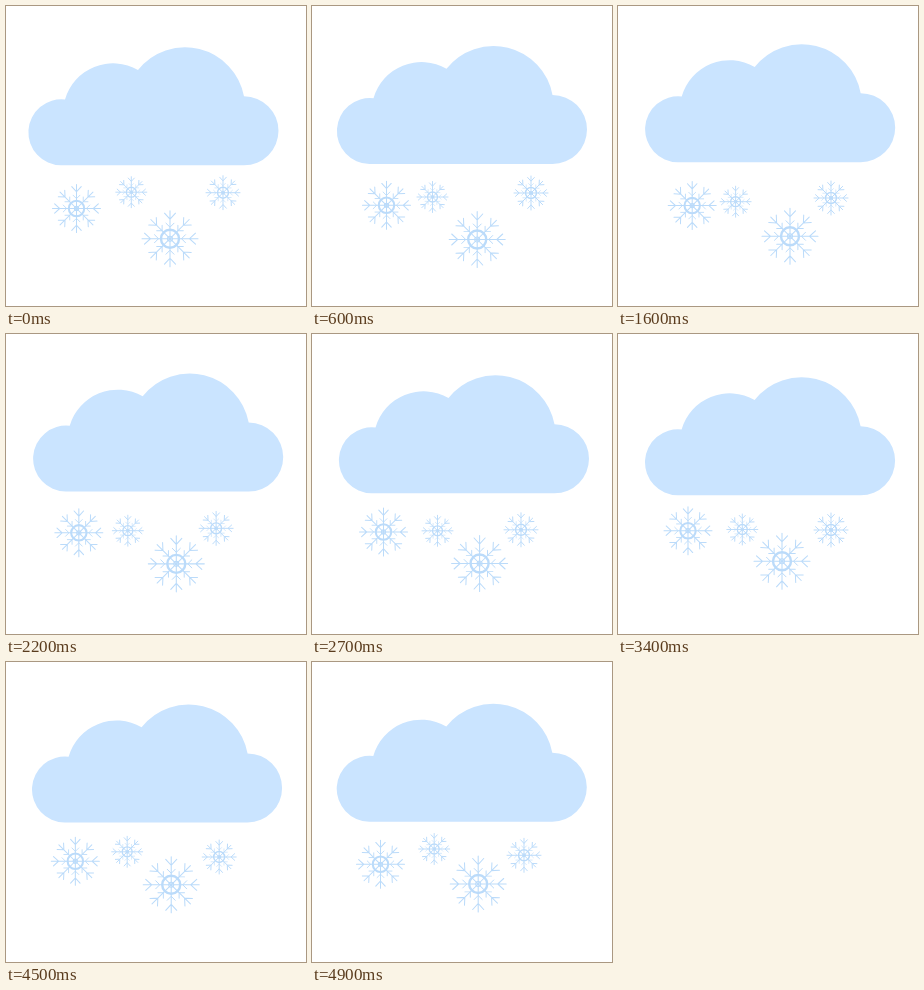
These frames come from a looping animation (300 by 300 pixels, 5 s). An HTML page:

```html
<!DOCTYPE html>
<html lang="en">
<head>
<meta charset="utf-8">
<title>Snow cloud</title>
<style>
html, body { margin: 0; width: 100%; height: 100%; overflow: hidden; background: #fff; }
svg { display: block; width: 100%; height: 100%; }
.flake { fill: none; stroke: #bbdbfa; stroke-linecap: round; }
</style>
</head>
<body>
<svg viewBox="0 0 300 300">
  <defs>
    <g id="arm">
      <path d="M0 0V-28M-5.5 -25.5L0 -19.5L5.5 -25.5"/>
      <path d="M-4 -15.5L0 -11.5L4 -15.5" stroke-width="1"/>
    </g>
    <g id="flake"></g>
  </defs>
  <path id="cloud" fill="#cae4ff" d="M55 159.3A33 33 0 1 1 59 93.5A50 50 0 0 1 132 64A60 60 0 0 1 238 90.3A34.5 34.5 0 0 1 238 159.3Z"/>
  <g id="snow"></g>
</svg>
<script>
const LOOP = 5000, STEP = 100;
const times = [0, 600, 1600, 2700, 3400, 4100, 4900];
const NS = 'http://www.w3.org/2000/svg';
const $ = id => document.getElementById(id);

function add(parent, tag, attrs) {
  const el = document.createElementNS(NS, tag);
  for (const k in attrs) el.setAttribute(k, attrs[k]);
  return parent.appendChild(el);
}

for (let i = 0; i < 8; i++)
  add($('flake'), 'use', { href: '#arm', transform: `rotate(${i * 45}) scale(${i % 2 ? 0.97 : 1})` });
add($('flake'), 'circle', { r: 9, 'stroke-width': 2.4 });
add($('flake'), 'circle', { r: 2.5 });

const cloudPath = {
  x: [0, 2.5, 4.7, 4.5, 4.6, 4.6, 2.3],
  y: [0, -1.3, -3.1, 0, 2, 1.8, 0.4]
};
const flakes = [
  { r: 24, x: [70.5, 74.5, 74.2, 71.5, 70, 70, 68.5], y: [202.5, 199.3, 199.6, 198, 196.7, 196.8, 202.3] },
  { r: 15.5, x: [125.3, 120.5, 117.6, 125.5, 124.3, 120.8, 122.2], y: [186.2, 191, 195.7, 196.8, 195.5, 192.4, 187] },
  { r: 28, x: [164, 165.2, 172, 167.6, 164, 164.4, 166.2], y: [232.7, 233.5, 230.3, 229.5, 227.3, 223.8, 222] },
  { r: 17, x: [217, 219, 213, 209, 213, 214, 212], y: [186.7, 187, 192, 195.8, 196, 196.3, 193.3] }
];

for (const f of flakes)
  f.el = add($('snow'), 'use', { href: '#flake', class: 'flake', 'stroke-width': 1.25 * 28 / (f.r + 5) });

// Smooth curve through unevenly spaced keys
function sample(v, t) {
  const last = times.length - 1;
  let i = 0;
  while (i < last - 1 && t > times[i + 1]) i++;
  const slope = k => {
    const a = Math.max(0, k - 1), b = Math.min(last, k + 1);
    return (v[b] - v[a]) / (times[b] - times[a]);
  };
  const h = times[i + 1] - times[i], u = (t - times[i]) / h;
  const u2 = u * u, u3 = u2 * u;
  return (2 * u3 - 3 * u2 + 1) * v[i] + (u3 - 2 * u2 + u) * h * slope(i)
    + (3 * u2 - 2 * u3) * v[i + 1] + (u3 - u2) * h * slope(i + 1);
}

function place(el, path, t, scale = 1) {
  el.setAttribute('transform', `translate(${sample(path.x, t)} ${sample(path.y, t)}) scale(${scale})`);
}

function draw(t) {
  place($('cloud'), cloudPath, t);
  for (const f of flakes) place(f.el, f, t, f.r / 28);
}

const start = performance.now();
function tick() {
  const t = (performance.now() - start) % LOOP;
  draw(Math.floor(t / STEP) * STEP);
  requestAnimationFrame(tick);
}
tick();
</script>
</body>
</html>
```
